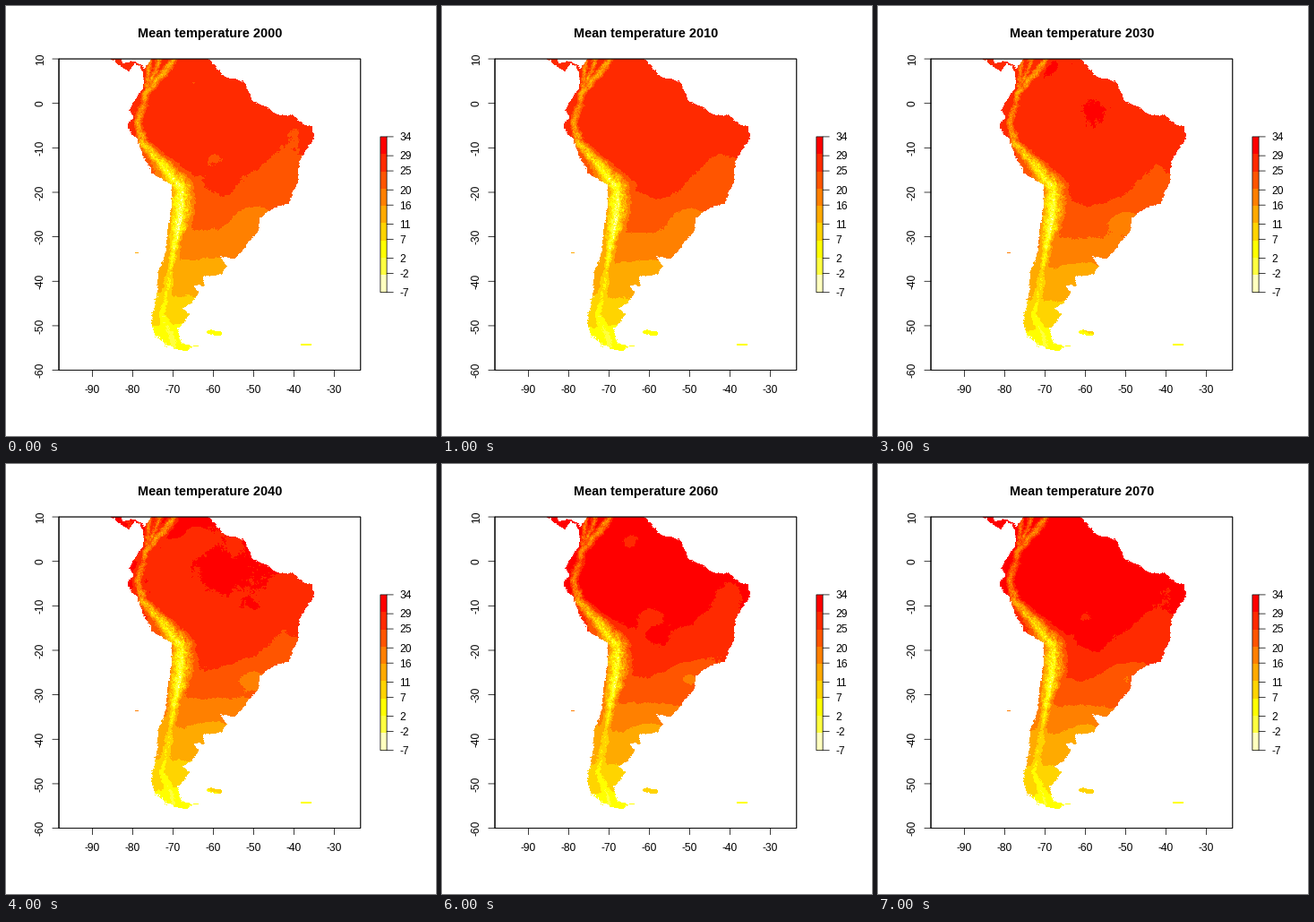
Recreate the animation shown at these times as a matplotlib script. Size 480 px wide and 480 px high, loop 8 s.

```python
import numpy as np
import matplotlib.pyplot as plt
from matplotlib.animation import FuncAnimation
from matplotlib.path import Path
from matplotlib.patches import Rectangle

SIZE = 480
LEFT, RIGHT, TOP, BOTTOM = 59, 396, 59, 406
BOX = (59.04, 59.04, 395.8, 406.56)
BAR = (417.9, 145.92, 425.1, 319.68)
BREAKS = np.linspace(-7, 34, 10)
COLORS = ["#FFFFBF", "#FFFF40"] + [
    f"#FF{round(255 * k / 6):02X}00" for k in range(6, -1, -1)]
FRAMES = 8

# Key points of the coast as (longitude, latitude); noise roughens it
COAST = [
    (-67.3, -55.8), (-71.5, -54.6), (-74.6, -52.5), (-75.5, -49),
    (-75.4, -46.7), (-74, -43), (-73.4, -37.2), (-71.7, -33),
    (-71.3, -28), (-70.3, -23), (-70.3, -18.4), (-75.2, -15.4),
    (-76.3, -13.8), (-79, -8.4), (-81.1, -6), (-81.3, -4.4),
    (-79.9, -2.8), (-80.9, -1.5), (-80.1, 0.3), (-78.6, 2.4),
    (-77.3, 3.7), (-77.4, 6.4), (-78.3, 8.4), (-79.6, 8.9),
    (-80.9, 7.2), (-82.9, 8.1), (-85.8, 10.2), (-83.1, 10.2),
    (-82.2, 9), (-79.2, 9.5), (-77, 8), (-75.6, 10.2),
    (-61.4, 10.2), (-57.3, 6), (-52.6, 5.1), (-50.1, 0.6),
    (-44.3, -2.4), (-40, -2.8), (-37, -4.9), (-35.4, -5.1),
    (-34.8, -7.5), (-38.9, -13.2), (-39.2, -17.7), (-41.2, -22.2),
    (-45, -23.4), (-48.5, -25.8), (-48.8, -28.5), (-53.6, -34),
    (-54.9, -34.9), (-58.4, -34.3), (-56.7, -36.6), (-58, -38.4),
    (-62.1, -39), (-62.3, -40.8), (-65, -41), (-63.7, -42.5),
    (-65.5, -44.7), (-67.4, -46), (-65.8, -47.4), (-69, -50.8),
    (-68, -53.6), (-65.2, -54.8),
]

# Islands: x, y, half width, half height
ISLANDS = [(229, 364, 5, 2.6), (236, 365.5, 5, 3), (335, 378, 7, 1.3),
           (212, 379.5, 2.8, 0.9), (146, 275.5, 1.7, 1)]

# Warm and cool areas: x, y, spread x, spread y, degrees
AREAS = [
    (312, 192, 24, 34, -3.3), (325, 142, 14, 14, -1.4), (210, 83, 9, 9, -2),
    (232, 168, 9, 9, -1.3), (242, 200, 11, 13, 1.2), (192, 72, 12, 9, 1),
    (237, 118, 16, 14, 1), (278, 163, 11, 15, 1.1), (178, 122, 22, 28, -0.7),
    (258, 95, 9, 12, -0.8), (277, 238, 16, 11, -4.5), (231, 295, 12, 6, -1.8),
]

rng = np.random.default_rng(7)
X, Y = np.meshgrid(np.arange(LEFT, RIGHT) + 0.5, np.arange(TOP, BOTTOM) + 0.5)


def lon_x(lon):
    return 501.5 + 4.5 * lon


def lat_y(lat):
    return 108.69 - 4.9646 * lat


def bump(v, center, spread, power=2):
    return np.exp(-np.abs((v - center) / spread) ** power)


def fractal(power):
    """Rough random field with unit spread."""
    fy = np.fft.fftfreq(X.shape[0])[:, None]
    fx = np.fft.fftfreq(X.shape[1])[None, :]
    k = np.hypot(fx, fy)
    k[0, 0] = 1
    field = np.fft.ifft2(np.fft.fft2(rng.normal(size=X.shape)) * k ** -power).real
    return (field - field.mean()) / field.std()


def land_mask():
    coast = Path([(lon_x(a), lat_y(b)) for a, b in COAST])
    rough = np.where((Y > 318) & (X < 186), 1.4, 0.7)
    pts = np.column_stack([(X + rough * fractal(0.9)).ravel(),
                           (Y + rough * fractal(0.9)).ravel()])
    mask = coast.contains_points(pts).reshape(X.shape)
    for x, y, a, b in ISLANDS:
        mask |= ((X - x) / a) ** 2 + ((Y - y) / b) ** 2 < 1
    return mask


def crest(y):
    """Horizontal position of the main mountain chain."""
    return np.interp(y, [59, 97, 130, 152, 184, 203, 232, 280, 345, 376],
                     [188, 157, 147, 152, 181, 198, 198, 187, 174, 187])


def mountain_cooling(x, y):
    slope = (crest(y + 3) - crest(y - 3)) / 6
    away = (x - crest(y)) / np.hypot(1, slope)
    height = 5 + 13 * bump(np.maximum(y, 140), 205, 80, 4)
    width = 3.5 + 7.5 * bump(y, 212, 45)
    cool = height * bump(away, 0, width, 2.4)
    # Two lower branches fan out in the north
    for lean in (0.4, 0.1):
        spur = 11 * bump(x, 157 + (97 - y) * lean, 2.5) * (y < 97)
        cool = np.maximum(cool, spur)
    return cool


def base_temperature():
    temp = np.interp(Y, [59, 160, 205, 230, 285, 325, 385],
                     [26.9, 26.9, 24.4, 22.9, 15.7, 10.8, 2.9])
    for cx, cy, sx, sy, amp in AREAS:
        temp += amp * bump(X, cx, sx * 1.4) * bump(Y, cy, sy * 1.4)
    # Cold current along the western shore
    temp -= (X < crest(Y)) * 6 * bump(Y, 225, 50)
    broad, rough, fine = fractal(1.6), fractal(1), fractal(0.6)
    cool = mountain_cooling(X + 1.3 * fractal(1.1), Y)
    temp -= cool * (1 + 0.14 * rough + 0.14 * fine)
    return temp + 0.3 * broad + 0.12 * rough


land = land_mask()
base = base_temperature()
gain = np.interp(Y, [190, 310], [1, 0.4])
palette = np.array([[int(c[i:i + 2], 16) for i in (1, 3, 5)] for c in COLORS], np.uint8)


def draw_map(i):
    warming = 4.7 * i / (FRAMES - 1)
    pixels = palette[np.digitize(base + warming * gain, BREAKS[1:-1])]
    pixels[~land] = 255
    return pixels


fig = plt.figure(figsize=(4.8, 4.8), dpi=100, facecolor="white")
ax = fig.add_axes([0, 0, 1, 1])
PX = 0.72
PEN = dict(lw=0.75 * PX, snap=False, zorder=3)


def line(x, y):
    ax.plot(x, y, color="black", solid_capstyle="round", **PEN)


def label(x, y, text, size=12, **kw):
    return ax.text(x, y, text, fontsize=size * PX, family="Liberation Sans",
                   va="baseline", **kw)


def box(x0, y0, x1, y1):
    ax.add_patch(Rectangle((x0, y0), x1 - x0, y1 - y0, fill=False, ec="black", **PEN))


image = ax.imshow(draw_map(0), extent=(LEFT, RIGHT, BOTTOM, TOP),
                  interpolation="nearest", aspect="auto")
ax.set_xlim(0, SIZE)
ax.set_ylim(SIZE, 0)
ax.axis("off")

for _ in range(2):
    box(*BOX)
x0, y0, x1, y1 = BOX
line([x0, x0], [y0, y1])
line([lon_x(-90), lon_x(-30)], [y1, y1])
for lon in range(-90, -29, 10):
    x = lon_x(lon)
    line([x, x], [y1, y1 + 7.2])
    label(x, 432, str(lon), ha="center")
for lat in range(10, -61, -10):
    y = lat_y(lat)
    line([x0, x0 - 7.2], [y, y])
    label(42, y, str(lat), ha="center", rotation=90, rotation_mode="anchor")

x0, y0, x1, y1 = BAR
step = (y1 - y0) / len(COLORS)
for n, color in enumerate(COLORS):
    ax.add_patch(Rectangle((x0, y1 - (n + 1) * step), x1 - x0, step, fc=color, lw=0))
box(*BAR)
for mark in np.round(BREAKS).astype(int):
    y = y1 - (mark + 7) / 41 * (y1 - y0)
    line([x1, x1 + 7.2], [y, y])
    label(439, y + 4.3, str(mark), ha="left")

title = label(227.2, 35, "", 14.5, ha="center", weight="bold")


def update(i):
    image.set_data(draw_map(i))
    title.set_text(f"Mean temperature {2000 + 10 * i}")
    return image, title


anim = FuncAnimation(fig, update, frames=FRAMES, interval=1000, repeat=True,
                     repeat_delay=0)
plt.show()
```
